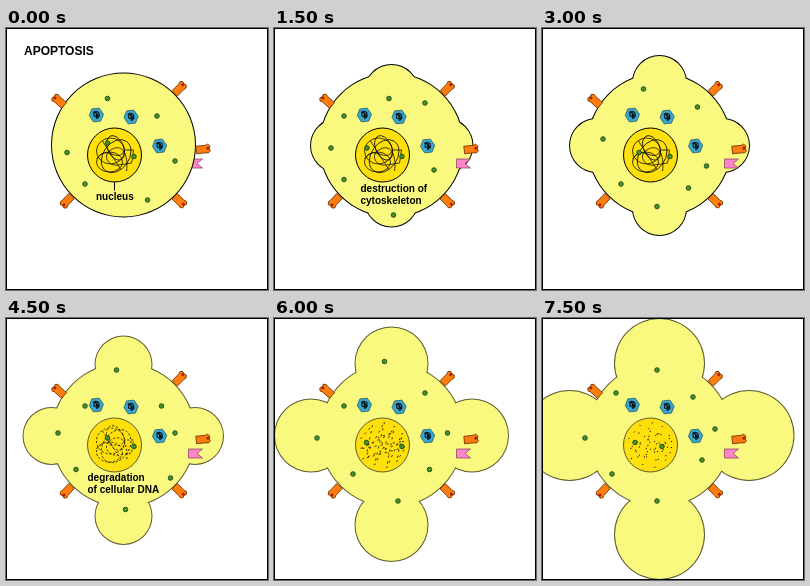
Write an HTML page without scripts that moves like this. It is 262 px wide and 262 px high and loops after 8 s.

```html
<!DOCTYPE html>
<html lang="en">
<head>
<meta charset="utf-8">
<title>Apoptosis</title>
<style>
html, body { margin: 0; width: 100%; height: 100%; overflow: hidden; background: #fff; }
svg { display: block; width: 100%; height: 100%; }
text { font: bold 10px "Liberation Sans", Arial, sans-serif; }
.title { font-size: 12px; }

/* lobes are round-capped points of radius --r */
.rim, .skin { fill: none; stroke-linecap: round; }
.rim { stroke: var(--ink); stroke-width: calc(var(--r) * 2px + 1px); }
.skin { stroke: #f9f980; stroke-width: calc(var(--r) * 2px - 1px); }
.edge { fill: var(--ink); }
.nucleus { fill: #ffe00c; stroke: var(--ink); }

.dots { fill: none; stroke: none; marker: url(#dot); }
.dna { fill: none; stroke: #111; stroke-width: .8; }
.cut { stroke-dasharray: 2.2 1.8; }
.bits { stroke-dasharray: 2.2 4; }
.specks { stroke-width: 1; stroke-dasharray: 1.2 7.5; }

.stage { --ink: #000; visibility: hidden; animation: show 8s step-end calc(var(--i) * 1.5s - 8s) infinite; }
.soft { --ink: #5c5c30; }
.last { animation: tail 8s step-end infinite; }
@keyframes show { 0% { visibility: visible; } 18.75%, 100% { visibility: hidden; } }
@keyframes tail { 0% { visibility: hidden; } 93.75%, 100% { visibility: visible; } }
</style>
</head>
<body>
<svg viewBox="0 0 262 262">
<defs>
  <marker id="dot" markerUnits="userSpaceOnUse" markerWidth="8" markerHeight="8" viewBox="-4 -4 8 8">
    <circle r="2.3" fill="#46922f" stroke="#1c4a14" stroke-width=".9"/>
  </marker>

  <circle id="edge" class="edge" cx="117.5" cy="117" r="72.5"/>
  <circle id="flesh" cx="117.5" cy="117" r="71.5" fill="#f9f980"/>
  <path id="flag" d="M182.5 131h14l-5.5 4.5 5.5 4.5h-14z" fill="#ff85c8" stroke="#7a3c5c" stroke-width=".7"/>

  <g id="receptor">
    <path d="M0-3.7 9.5-3.7 12-4.6 14-2.6 13.2 0 14 2.4 11.8 4.3 9.5 3.8 0 3.8z" fill="#ff7d0a" stroke="#6b2c00" stroke-width=".8"/>
    <circle cx="11.8" cy="-.5" r="1.5" fill="#a81c00"/>
  </g>
  <g id="hex" transform="rotate(-6)">
    <path d="M-7-.2-3.8-6.5 3.6-6.5 7.2 0 3.8 6.5-3.6 6.5z" fill="#36a9cf" stroke="#2a5a6c" stroke-width=".8"/>
    <path d="M-3-2.6C-1-5 4-3 2.6 0S-3 2-2.4-1 2-2 1 1M0-3.6V4M2.8-2.4V1.6L0 3.8" fill="none" stroke="#0c1820" stroke-width="1.1"/>
  </g>

  <g id="parts">
    <use href="#receptor" transform="translate(58 77.5) rotate(222)"/>
    <use href="#receptor" transform="translate(168.7 65.3) rotate(-45)"/>
    <use href="#receptor" transform="translate(190.2 122) rotate(-6)"/>
    <use href="#receptor" transform="translate(65.6 168) rotate(133)"/>
    <use href="#receptor" transform="translate(168.7 168.2) rotate(45)"/>
    <use href="#hex" x="90.3" y="87"/>
    <use href="#hex" x="125" y="89"/>
    <use href="#hex" x="153.5" y="118"/>
    <circle class="nucleus" cx="108.5" cy="127" r="27"/>
  </g>

  <!-- overlapping loops, then a loose strand across them -->
  <g id="coil" transform="translate(108.5 127)">
    <ellipse cx="-4" cy="-4" rx="14" ry="13"/>
    <ellipse cx="2" cy="0" rx="13" ry="18" transform="rotate(35)"/>
    <ellipse cx="-5" cy="7" rx="13" ry="10"/>
    <ellipse cx="4" cy="-6" rx="8" ry="13" transform="rotate(-25)"/>
    <path d="M-18 4C-8-12 4 10 10-5H19L17 8 4 10C-6 12-14 0-2-6S14 4 12 16M-12-14 6 14"/>
  </g>
  <path id="scatter" transform="translate(108.5 127)" d="M-22-6-10-20-16 10 2-23-8 20 12-19 4 23 20-12 14 17 23 2-20 14 22-4-23 4 10-12-4-8 8 12"/>

  <path id="lobes1" d="M117.5 63.5h.01M63.5 117.5h.01M172 117.5h.01M117.5 172h.01"/>
  <path id="lobes2" d="M117.5 54.5h.01M54.5 117.5h.01M180.5 117.5h.01M117.5 180.5h.01"/>
  <path id="lobes3" d="M117.5 46.5h.01M45.5 118h.01M189 118h.01M117.5 198h.01"/>
  <path id="lobes4" d="M117.5 45.5h.01M37 117.5h.01M198 117.5h.01M117.5 207h.01"/>
  <path id="lobes5" d="M117.5 45.5h.01M27.5 117.5h.01M207 117.5h.01M117.5 216.5h.01"/>
</defs>

<g class="stage" style="--i:0">
  <use href="#flag"/>
  <use href="#edge"/><use href="#flesh"/>
  <use href="#parts"/>
  <use href="#coil" class="dna"/>
  <polyline class="dots" points="101.5,70.5 151,88 101.5,115 128,128.5 61,124.5 79,156 169,133 141.5,172"/>
  <path d="M108.5 154v8.5" stroke="#000"/>
  <text class="title" x="18" y="27">APOPTOSIS</text>
  <text x="90" y="172">nucleus</text>
</g>

<g class="stage" style="--i:1;--r:27">
  <use href="#lobes1" class="rim"/><use href="#edge"/>
  <use href="#lobes1" class="skin"/><use href="#flesh"/>
  <use href="#flag"/><use href="#parts"/>
  <use href="#coil" class="dna"/>
  <polyline class="dots" points="115,70.5 151,75 70,88 57,120 93,120 128,128.5 70,151.5 160,142 119.5,187"/>
  <text x="86.5" y="164">destruction of</text>
  <text x="86.5" y="176">cytoskeleton</text>
</g>

<g class="stage" style="--i:2;--r:27">
  <use href="#lobes2" class="rim"/><use href="#edge"/>
  <use href="#lobes2" class="skin"/><use href="#flesh"/>
  <use href="#flag"/><use href="#parts"/>
  <use href="#coil" class="dna"/>
  <polyline class="dots" points="101.5,61 155.5,79 61,111 97,124.5 128,128.5 79,156 164.5,138 146.5,160 115,178.5"/>
</g>

<g class="stage soft" style="--i:3;--r:28.5">
  <use href="#lobes3" class="rim"/><use href="#edge"/>
  <use href="#lobes3" class="skin"/><use href="#flesh"/>
  <use href="#flag"/><use href="#parts"/>
  <use href="#coil" class="dna cut"/>
  <polyline class="dots" points="110.5,52 79,88 155.5,88 52,115 169,115 101.5,120 128,128.5 70,151.5 164.5,160 119.5,191.5"/>
  <text x="81.5" y="163">degradation</text>
  <text x="81.5" y="175">of cellular DNA</text>
</g>

<g class="stage soft" style="--i:4;--r:36.5">
  <use href="#lobes4" class="rim"/><use href="#edge"/>
  <use href="#lobes4" class="skin"/><use href="#flesh"/>
  <use href="#flag"/><use href="#parts"/>
  <use href="#scatter" class="dna bits"/>
  <polyline class="dots" points="110.5,43.5 70,88 151,75 43,120 173.5,115 92.5,124.5 128,128.5 79,156 155.5,151.5 124,183"/>
</g>

<g class="stage soft last" style="--r:45">
  <use href="#lobes5" class="rim"/><use href="#edge"/>
  <use href="#lobes5" class="skin"/><use href="#flesh"/>
  <use href="#flag"/><use href="#parts"/>
  <use href="#scatter" class="dna specks"/>
  <polyline class="dots" points="115,52 74,75 151,79 43,120 173,111 93,124.5 120,128.5 70,156 160,142 115,183"/>
</g>

<rect x=".5" y=".5" width="261" height="261" fill="none" stroke="#000"/>
</svg>
</body>
</html>
```
